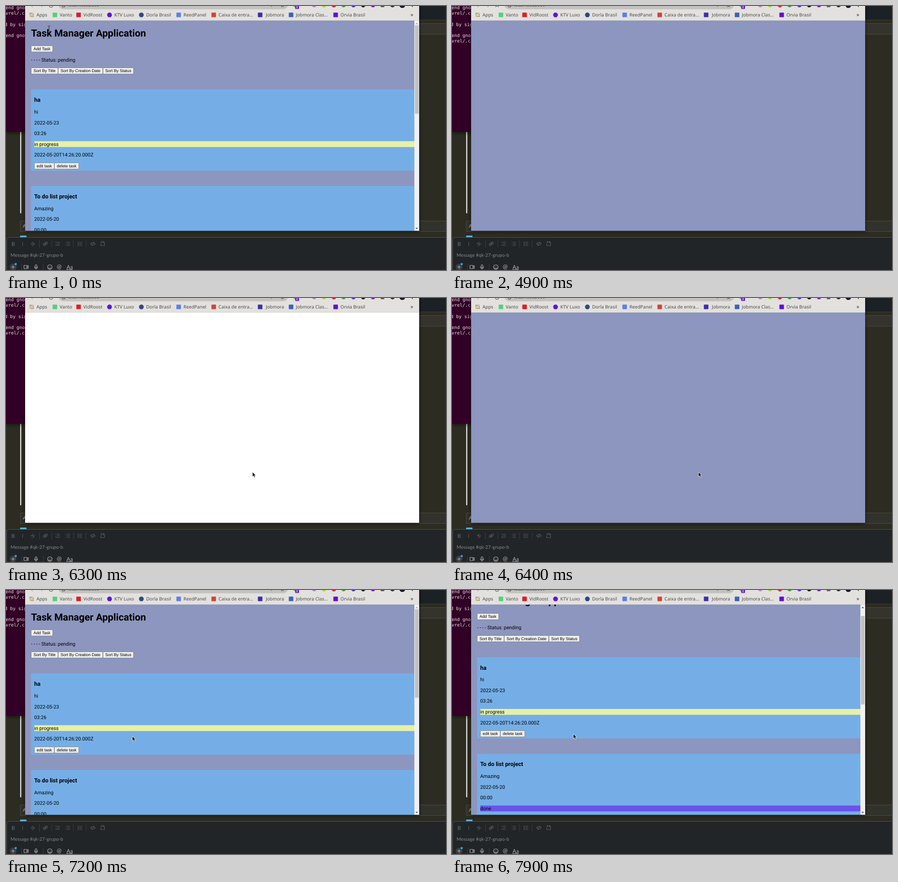
Recreate the animation shown at these times as an HTML page. Size 967 by 579 pixels, loop 8000 ms.

```html
<!DOCTYPE html>
<html lang="en">
<head>
<meta charset="utf-8">
<title>Task Manager</title>
<style>
html, body { margin: 0; width: 967px; height: 579px; overflow: hidden; background: #2d2c22; }
svg { display: block; }
text { font-family: Roboto, sans-serif; font-size: 10.8px; white-space: pre; text-rendering: geometricPrecision; }
.h1 { font-size: 21.6px; font-weight: 700; }
.h3 { font-size: 12.62px; font-weight: 700; }
.btn { font: 9px "Liberation Sans", Arial, sans-serif; text-anchor: middle; }
.mark { font: 10.1px "Noto Sans", sans-serif; fill: #4b4a48; }
.term { font: 10px "DejaVu Sans Mono", monospace; fill: #e6dfe4; }
.chat { font: 10.4px Lato, sans-serif; fill: #85888a; }
.line { fill: none; stroke-width: 1.1; stroke-linecap: round; stroke-linejoin: round; }
</style>
</head>
<body>
<script>
const rect = (x, y, w, h, fill, extra = '') =>
  `<rect x="${x}" y="${y}" width="${w}" height="${h}" fill="${fill}" ${extra}/>`;
const dot = (x, y, r, fill) => `<circle cx="${x}" cy="${y}" r="${r}" fill="${fill}"/>`;
const text = (x, y, s, cls = '', extra = '') => `<text x="${x}" y="${y}" class="${cls}" ${extra}>${s}</text>`;
const line = (d, color, extra = '') => `<path class="line" d="${d}" stroke="${color}" ${extra}/>`;
const button = (x, y, w, label) =>
  rect(x + .35, y + .35, w - .7, 13.5, '#efefef', 'rx="1.4" stroke="#6b6b6b" stroke-width=".7"') +
  text(x + w / 2, y + 10.2, label, 'btn');

// Terminal and editor behind the browser, chat box below
function desktop() {
  const box = 'stroke="#4b4b43" stroke-width="1"';
  return rect(0, 0, 967, 579, '#2d2c22') +
    rect(900, 0, 67, 30.5, '#1c2126') + rect(900, 30, 67, 1, '#3c3c32') +
    rect(880.5, 38.5, 100, 23.5, '#34342d', box) +
    rect(31.5, 471.5, 950, 23, '#32322c', box) +
    text(37, 486, 'A', 'chat', 'style="fill:#c5c5c0"') +
    rect(31, 276, 2.6, 178.5, '#dcdcd6') +
    rect(0, 0, 60, 276, '#330627', 'filter="url(#soft)"') +
    text(-1, 7, 'end gnome', 'term') + text(-1, 19, 'vrel/.cac', 'term') +
    text(-3, 43.5, 'd by sign', 'term') + text(-1, 67.5, 'end gnome', 'term') +
    text(-1, 79.5, 'vrel/.cac', 'term', 'id="newLine"') +
    rect(31, 503.5, 14, 6, '#55b4e0', 'rx="1"') +
    rect(1.5, 507.5, 980, 90, '#222527', 'rx="4" stroke="#505356"') + chat();
}

function chat() {
  const dim = '#5c5f62', lit = '#b4b6b8';
  const rows = x => `M${x} 518H${x + 6}M${x} 521.5H${x + 6}M${x} 525H${x + 6}`;
  const glyph = (x, s, style) => text(x, 525.5, s, 'chat', `style="fill:${dim};font-size:11.5px;${style}"`);
  return glyph(12, 'B', 'font-weight:700') + glyph(35, 'I', 'font-style:italic') + glyph(56, 'S', '') +
    line('M54.5 521.5h9', dim) + line('M73.5 514v15M101 514v15M148 514v15M176 514v15', '#3b3e40') +
    line('M85.5 520l2-2a2 2 0 0 1 3 3l-2 2M87.500 522.500l-2 2a2 2 0 0 1-3-3l2-2M85 523l3-3', dim) +
    line(rows(112) + 'M109.500 517v2M109.500 523l1 2h-1', dim) +
    line(rows(134) + 'M131.500 518h.1M131.500 521.500h.1M131.500 525h.1', dim) +
    line(rows(161) + 'M158.500 517v9', dim) +
    line('M189 518.500l-3 3 3 3M193 518.500l3 3-3 3M192 517.500l-2 8', dim) +
    line('M212 517.500h4.500v8h-8.500v-4M210.500 516l-2 2 2 2M213.500 516l1.500 2-1.500 2', dim) +
    text(10, 550, 'Message #qk-27-grupo-b', 'chat') +
    dot(15.5, 572.5, 7.5, '#3a3d40') + line('M12 572.500h7M15.500 569v7', lit) + dot(21.3, 566, 2.5, '#2f9fe0') +
    line('M34.500 566v13', '#3b3e40') +
    line('M39.500 569h6.500v7h-6.500zM46 571.500l3-2v6l-3-2', lit) +
    line('M66 567.500a1.800 1.800 0 0 1 1.800 1.800v2.500a1.800 1.800 0 0 1-3.600 0v-2.500a1.800 1.800 0 0 1 1.800-1.800M62.500 572a3.500 3.500 0 0 0 7 0M66 575.500v2', lit) +
    line('M82 566v13', '#3b3e40') +
    line('M101.300 572.500a5 5 0 1 1-10 0a5 5 0 1 1 10 0M93.800 574a2.700 2.700 0 0 0 5 0M94.500 571h.2M98 571h.2', lit) +
    text(111.5, 576.3, '@', 'chat', `style="fill:${lit};font-size:13px"`) +
    text(133, 576.5, 'Aa', 'chat', `style="fill:${lit};font-size:12px"`) + line('M133 578.500h13', lit);
}

// Browser chrome: bottom of the toolbar and the bookmark bar
function toolbar() {
  const ink = '#55534f';
  let s = rect(42, 0, 866, 32, '#e2e1de') + rect(42, 31, 866, 1, '#d3d1cd') +
    rect(115, -20, 505, 27.3, '#c4c2bf', 'rx="11"') + dot(126.5, -1, 4, ink) + dot(126.5, -1, 2.8, '#c4c2bf') +
    text(136, .6, 'localhost:3000', 'mark', 'style="fill:#302f2d"') +
    line('M58 2l-4-4M78 2l4-4', '#9b9995') +
    line('M103-1a4 4 0 1 1-8 0', ink, 'id="reload"') + line('M96 2l6-6M102 2l-6-6', ink, 'id="stop"') +
    line('M581-2l4 1-2 2M605 2l2.600-2 2.600 2', ink) +
    dot(636, -2, 5, '#7fae5a') + rect(635.5, -4, 8.5, 10.5, '#6a14d1', 'rx="1.500"') +
    text(637.7, 5.2, '8', 'btn', 'style="fill:#fff;font-size:7px;text-anchor:start"');
  const icons = ['#b58ac4', '#a6d436', '#d5202c', '#4f9a4c', '#5632d8', '#111', '#7a20c0', '#57534f', '#333', '#17132a'];
  icons.forEach((c, i) => s += i === 7
    ? rect(823.5, -5, 8, 7.5, c, 'rx="1"')
    : dot(677.500 + i * 21.5, -2, i === 9 ? 6.3 : 5, c));
  s += dot(893, 1, 1.2, ink);
  for (let i = 0; i < 9; i++)
    s += rect(52 + i % 3 * 3.4, 15 + (i / 3 | 0) * 3.4, 2, 2, ['#d33a30', '#4a8f3c', '#e0a020'][(i + (i / 3 | 0)) % 3]);
  const marks = [
    [67, 'Apps'], [118, 'Vanto', '#56cf7c'], [170, 'VidRoost', '#dc1f24'], [238, 'KTV Luxo', '#5d14d8', 1],
    [308, 'Dorla Brasil', '#2f4a7d', 1], [390, 'ReedPanel', '#5b80e6'], [467, 'Caixa de entra…', '#d0443a'],
    [571, 'Jobmora', '#3d2fa8'], [637, 'Jobmora Clas…', '#3c62b5'], [735, 'Orvia Brasil', '#6010d0']
  ];
  for (const [x, label, color, round] of marks) {
    const cx = label === 'Jobmora' ? 558.5 : x - 10.5;
    if (color) s += round ? dot(cx, 19.5, 5.2, color) : rect(cx - 5, 14.5, 10, 10, color, 'rx="1"');
    s += text(x, 23.2, label, 'mark');
  }
  return s + text(889, 22.8, '»', 'mark', 'style="font-size:12px;fill:#333"');
}

function card(y, title, note, date, time, status, color, stamp) {
  return rect(55, y, 843, 178, '#75aee6') + rect(62, y + 113.4, 836, 12.8, color) +
    text(62, y + 27.2, title, 'h3') +
    [note, date, time, status, stamp].map((s, i) => text(62, y + 52.8 + i * 23.6, s)).join('') +
    button(62, y + 160.6, 44.3, 'edit task') + button(106.3, y + 160.6, 54, 'delete task');
}

function app() {
  return `<g id="app"><svg x="42" y="32" width="856" height="461" viewBox="42 32 856 461"><g id="content">` +
    text(55, 66.8, 'Task Manager Application', 'h1') + button(55, 86.8, 48, 'Add Task') +
    text(55, 121.8, '- - - - Status: pending') +
    button(55, 135.2, 59.5, 'Sort By Title') + button(114.5, 135.2, 98.3, 'Sort By Creation Date') +
    button(212.8, 135.2, 67.7, 'Sort By Status') +
    card(183.1, 'ha', 'hi', '2022-05-23', '03:26', 'in progress', '#e7f0a6', '2022-05-20T14:26:20.000Z') +
    card(394.9, 'To do list project', 'Amazing', '2022-05-20', '00:00', 'done', '#6a52ee', '2022-05-20T14:20:00.000Z') +
    '</g></svg>' + rect(897.5, 32, 10.5, 461, '#f1f1f1') + rect(898.8, 42.3, 8, 194, '#c1c1c1', 'id="thumb"') +
    '<path id="up" d="M900 39.700h5.400l-2.700-3z"/><path d="M900 486.500h5.400l-2.700 3z" fill="#505050"/></g>';
}

document.body.innerHTML = `<svg width="967" height="579" viewBox="0 0 967 579">
  <defs><filter id="soft" x="-20%" y="-20%" width="140%" height="140%">
    <feDropShadow dx="0" dy="2" stdDeviation="4" flood-opacity=".55"/></filter></defs>` +
  desktop() + rect(42, -10, 866, 503, '#8c96be', 'filter="url(#soft)"') +
  rect(42, 30, 866, 463, '#8c96be', 'id="page"') + app() + toolbar() +
  line('M92 43.500q2 0 2.500 1.500q.5-1.500 2.500-1.500M94.500 45v8.500M92 55q2 0 2.500-1.500q.5 1.500 2.500 1.500', '#e8e8ee', 'id="beam" style="stroke:#333;paint-order:stroke"') +
  '<path id="arrow" d="M.5.5v10.700l2.500-2.300 1.800 4 1.900-.8-1.800-3.900h3.400z" fill="#161616" stroke="#fff" stroke-width=".8"/></svg>';

const el = id => document.getElementById(id);
const show = (id, on) => el(id).style.display = on ? '' : 'none';
const latest = (keys, t) => keys.filter(k => k[0] <= t).pop();

// [time, x, y]; no position means hidden
const pointer = [
  [0], [600, 430, 220], [700, 707, 356], [900],
  [5200, 723, 442], [5300, 686, 438], [5400, 637, 428], [5500, 598, 419],
  [5700, 581, 405], [5800, 557, 390], [5900, 541, 381],
  [6900, 495, 370], [7000, 404, 346], [7100, 318, 327], [7200, 277, 320], [7500, 266, 315]
];
const scrolls = [[0, 0], [7700, 6.8], [7800, 19], [7900, 35.6]];

function draw(now) {
  const t = now % 8000;
  const loading = t >= 4900 && t < 6500;
  const [, x, y] = latest(pointer, t);
  const scroll = latest(scrolls, t)[1];
  show('newLine', t >= 100);
  show('beam', t < 600);
  show('arrow', x);
  if (x) el('arrow').setAttribute('transform', `translate(${x} ${y})`);
  show('app', !loading);
  show('stop', t >= 4900 && t < 6300);
  show('reload', t < 4900 || t >= 6300);
  el('page').setAttribute('fill', t >= 6300 && t < 6400 ? '#fff' : '#8c96be');
  el('content').setAttribute('transform', `translate(0 ${-scroll})`);
  el('thumb').setAttribute('y', 42.3 + scroll * .415);
  el('up').setAttribute('fill', scroll ? '#505050' : '#a3a3a3');
  requestAnimationFrame(draw);
}
draw(0);
</script>
</body>
</html>
```
